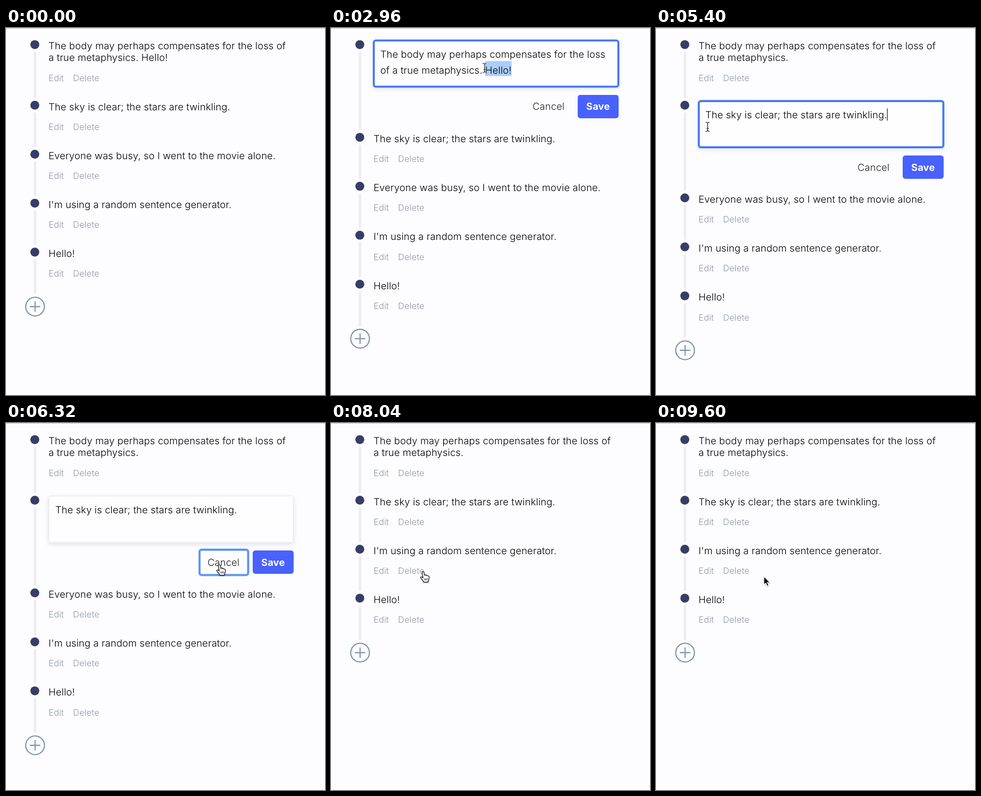
Animation of 600 by 691 pixels, one loop 9640 ms. Source, as an HTML page:

```html
<!DOCTYPE html>
<html lang="en">
<head>
<meta charset="utf-8">
<title>Editable timeline</title>
<style>
  html, body { margin: 0; width: 100%; height: 100%; overflow: hidden; background: #fdfcfe; }
  svg { display: block; width: 600px; height: 691px; }
  text {
    font: 330 18.33px Inter, "Open Sans", sans-serif;
    font-optical-sizing: none;
    letter-spacing: .008em;
    text-rendering: geometricPrecision;
    white-space: pre;
    fill: #000;
  }
  .link { font-size: 16.4px; fill: #8d98a6; }
  .cancel { fill: #1c1e26; }
  .save { font-weight: 700; fill: #fff; }
</style>
</head>
<body>
<svg id="stage" viewBox="0 0 600 691" xmlns="http://www.w3.org/2000/svg">
  <defs>
    <filter id="soft" x="-10%" y="-30%" width="120%" height="170%">
      <feDropShadow dx="0" dy="3" stdDeviation="4" flood-color="#1c2050" flood-opacity=".11"/>
    </filter>
    <filter id="drop" x="-50%" y="-50%" width="200%" height="200%">
      <feDropShadow dx="0" dy="1" stdDeviation="1" flood-opacity=".3"/>
    </filter>
  </defs>
  <rect width="600" height="691" fill="#fdfcfe"/>
  <rect width="600" height="1" fill="#c3c2c7"/>
</svg>
<script>
const LOOP = 9640;
const PITCH = 92.2, LINE = 21.9, EDIT_HEIGHT = 174.5, FIRST_DOT = 31.3;

// Moments at which the page changes.
const OPEN_1 = 1240, DRAG = 2320, ERASE = 3320, PRESS_SAVE = 4120, SAVED = 4280;
const OPEN_2 = 5360, PRESS_CANCEL = 6280, CANCELLED = 6440, REMOVED = 7400;

const svg = document.getElementById("stage");

function add(parent, tag, attrs = {}, content) {
  const node = document.createElementNS("http://www.w3.org/2000/svg", tag);
  for (const key in attrs) node.setAttribute(key, attrs[key]);
  if (content !== undefined) node.textContent = content;
  parent.appendChild(node);
  return node;
}
const label = (parent, x, y, content, kind = "") =>
  add(parent, "text", { x, y, class: kind }, content);
const show = (node, on) => node.setAttribute("display", on ? "inline" : "none");
const place = (node, x, y) => node.setAttribute("transform", `translate(${x} ${y})`);
const setText = (node, value) => {
  if (node.textContent !== value) node.textContent = value;
};

function focusRing(parent, x, y, width, height, color) {
  const g = add(parent, "g", { fill: "none" });
  const box = { x, y, width, height, rx: 4 };
  add(g, "rect", { ...box, stroke: "#8fb8fa", "stroke-width": 5, opacity: .75 });
  add(g, "rect", { ...box, stroke: color, "stroke-width": 2.6 });
  return g;
}

// Positions inside an item are relative to the centre of its dot.
function makeEditor(parent, lines) {
  const g = add(parent, "g");
  const area = { x: 80.5, y: -8, width: 460, height: 87.5, rx: 4 };
  add(g, "rect", { ...area, fill: "#fefdff", stroke: "#e4e4ec", filter: "url(#soft)" });
  const ring = focusRing(g, 80.5, -7.8, 460, 87, "#376cf0");
  const selection = add(g, "rect", { y: 31, height: 28, fill: "#a9cefb" });
  const rows = lines.map((s, i) => label(g, 92.7, 24.4 + i * 30, s));
  const caret = add(g, "rect", { width: 1.2, height: 23, fill: "#111" });
  const cancelRing = focusRing(g, 364, 93.2, 91.5, 47.6, "#4c8df6");
  label(g, 379, 123.2, "Cancel", "cancel");
  add(g, "rect", { x: 464, y: 94.6, width: 77, height: 44, rx: 5, fill: "#4861ff" });
  label(g, 480, 123.2, "Save", "save");
  const saveRing = focusRing(g, 464, 94.6, 77, 44, "#4c8df6");
  return { g, ring, selection, rows, caret, cancelRing, saveRing };
}

function makeItem(lines, editLines) {
  const g = add(svg, "g");
  const rail = add(g, "rect", { x: 52, y: 13.8, width: 5, fill: "#eeedf1" });
  add(g, "circle", { cx: 54.2, r: 8.4, fill: "#373d68" });
  const view = add(g, "g");
  const rows = lines.map((s, i) => label(view, 80, 9.1 + i * LINE, s));
  const extra = (lines.length - 1) * LINE;
  label(view, 80, 46.4 + extra, "Edit", "link");
  label(view, 126, 46.4 + extra, "Delete", "link");
  return { g, rail, view, rows, extra, editor: editLines && makeEditor(g, editLines) };
}

const sky = "The sky is clear; the stars are twinkling.";
const items = [
  makeItem(["The body may perhaps compensates for the loss of", "a true metaphysics. Hello!"],
    ["The body may perhaps compensates for the loss", "of a true metaphysics. Hello!"]),
  makeItem([sky], [sky]),
  makeItem(["Everyone was busy, so I went to the movie alone."]),
  makeItem(["I'm using a random sentence generator."]),
  makeItem(["Hello!"])
];

const plus = add(svg, "g", { fill: "none", stroke: "#8092a4", "stroke-width": 2.1 });
add(plus, "circle", { r: 17.6 });
add(plus, "path", { d: "M-9.8 0H9.8M0-9.8V9.8" });

// Pointers, each drawn with its hot spot at the origin.
const pointers = {
  arrow: add(svg, "g", { filter: "url(#drop)" }),
  hand: add(svg, "g", { filter: "url(#drop)" }),
  beam: add(svg, "g", { fill: "none", "stroke-linecap": "round" })
};
add(pointers.arrow, "path", {
  d: "M0 0V15.6L3.6 12.2L6.2 18.2L8.9 17L6.3 11.2H11.2Z",
  fill: "#000", stroke: "#fff", "stroke-width": 1.1
});
add(pointers.hand, "path", {
  d: "M-1.6 1.4C-1.5-.8 1.2-.8 1.7 1.2L3.2 7C3.6 5.4 6 5.5 6.4 7.4C7.2 6.2 9 6.6 9.2 8.2" +
     "C10.6 7.6 11.7 8.6 11.6 10.4C11.6 14 11 15 9.8 17.2V19.6H1.4" +
     "C.6 17-1.6 14.8-4 12.2C-5.6 10.2-3.2 8.8-1.4 10.4L.2 11.8Z",
  fill: "#fff", stroke: "#111", "stroke-width": 1.2, "stroke-linejoin": "round"
});
add(pointers.hand, "path", {
  d: "M3.2 12.6V16.4M5.6 12.6V16.4M8 12.4V16.2",
  fill: "none", stroke: "#111", "stroke-width": 1
});
const beamPath = "M-3.4-8.5Q0-8.5 0-6Q0-8.5 3.4-8.5M0-6V6M-3.4 8.5Q0 8.5 0 6Q0 8.5 3.4 8.5M-2 3H2";
add(pointers.beam, "path", { d: beamPath, stroke: "#fff", "stroke-width": 2.6 });
add(pointers.beam, "path", { d: beamPath, stroke: "#111", "stroke-width": 1.2 });

// Pointer route: time, x, y.
const route = [
  [400, 456, 196], [1000, 95, 92], [1240, 95, 92], [1400, 97, 99],
  [2120, 342, 81], [2320, 342, 81], [2960, 289, 75], [3320, 289, 75],
  [3760, 566, 146], [4120, 519, 153], [4640, 519, 153], [5240, 97, 186],
  [5400, 97, 186], [5600, 112, 194], [5720, 112, 194], [6240, 401, 267],
  [6720, 401, 267], [7080, 152, 280], [7480, 152, 280], [8040, 173, 280],
  [8280, 173, 280], [8720, 352, 262], [9240, 207, 294], [9440, 202, 288], [9600, 203, 289]
];

function pointerAt(t) {
  const i = route.findIndex(p => p[0] > t);
  if (i < 0) return route[route.length - 1].slice(1);
  if (i === 0) return null;
  const [t0, x0, y0] = route[i - 1], [t1, x1, y1] = route[i];
  const u = (t - t0) / (t1 - t0), k = u * u * (3 - 2 * u);
  return [x0 + (x1 - x0) * k, y0 + (y1 - y0) * k];
}

const inside = (x, y, left, top, right, bottom) =>
  x >= left && x <= right && y >= top && y <= bottom;

function pointerKind(x, y, shown) {
  for (const { item, top, editing } of shown) {
    const dy = y - top;
    if (editing) {
      if (inside(x, dy, 80, -8, 541, 80)) return "beam";
      if (inside(x, dy, 364, 94, 541, 139)) return "hand";
      continue;
    }
    const linkY = dy - item.extra;
    if (inside(x, linkY, 80, 30, 110, 53) || inside(x, linkY, 125, 30, 177, 53)) return "hand";
    for (let i = 0; i < item.rows.length; i++) {
      const right = 80 + item.rows[i].getComputedTextLength();
      if (inside(x, dy - i * LINE, 80, -8, right, 14)) return "beam";
    }
  }
  return "arrow";
}

function layout(t) {
  const open = t >= OPEN_1 && t < SAVED ? 0 : t >= OPEN_2 && t < CANCELLED ? 1 : -1;
  const shown = [];
  let top = FIRST_DOT;
  items.forEach((item, i) => {
    const gone = i === 2 && t >= REMOVED;
    show(item.g, !gone);
    if (gone) return;
    const editing = i === open;
    const height = editing ? EDIT_HEIGHT : PITCH + item.extra;
    place(item.g, 0, top);
    show(item.view, !editing);
    if (item.editor) show(item.editor.g, editing);
    item.rail.setAttribute("height", height - 27.6);
    shown.push({ item, top, editing });
    top += height;
  });
  place(plus, 54.7, top + 10.4);
  return shown;
}

function updateEditors(t, pointer) {
  const erased = t >= ERASE;
  const tail = erased ? "" : "Hello!";
  setText(items[0].rows[1], t >= SAVED ? "a true metaphysics." : "a true metaphysics. Hello!");

  const first = items[0].editor, second = items[1].editor;
  const line = first.rows[1], base = "of a true metaphysics. ";
  setText(line, base + tail);
  const end = 92.7 + line.getComputedTextLength();

  // The selection snaps to the letter edge nearest the pointer.
  let from = end;
  if (!erased && t >= DRAG && pointer) {
    for (let i = base.length; i < base.length + tail.length; i++) {
      const edge = line.getStartPositionOfChar(i).x;
      if (Math.abs(edge - pointer[0]) < Math.abs(from - pointer[0])) from = edge;
    }
  }
  const selected = end - from > 1;
  first.selection.setAttribute("x", from);
  first.selection.setAttribute("width", Math.max(0, end - from));
  show(first.selection, selected);

  const blink = start => Math.floor((t - start) / 500) % 2 === 0;
  const saving = t >= PRESS_SAVE;
  first.caret.setAttribute("x", end - .3);
  first.caret.setAttribute("y", 36);
  show(first.caret, !selected && !saving && blink(erased ? ERASE : OPEN_1));
  show(first.ring, !saving);
  show(first.saveRing, saving);
  show(first.cancelRing, false);

  const cancelling = t >= PRESS_CANCEL;
  second.caret.setAttribute("x", 92.7 + second.rows[0].getComputedTextLength());
  second.caret.setAttribute("y", 6);
  show(second.caret, !cancelling && blink(OPEN_2));
  show(second.ring, !cancelling);
  show(second.cancelRing, cancelling);
  show(second.selection, false);
  show(second.saveRing, false);
}

function render(t) {
  const pointer = pointerAt(t);
  const shown = layout(t);
  updateEditors(t, pointer);
  const kind = pointer && pointerKind(...pointer, shown);
  for (const name in pointers) {
    show(pointers[name], name === kind);
    if (name === kind) place(pointers[name], ...pointer);
  }
}

const start = performance.now();
function tick() {
  render((performance.now() - start) % LOOP);
  requestAnimationFrame(tick);
}
tick();
</script>
</body>
</html>
```
